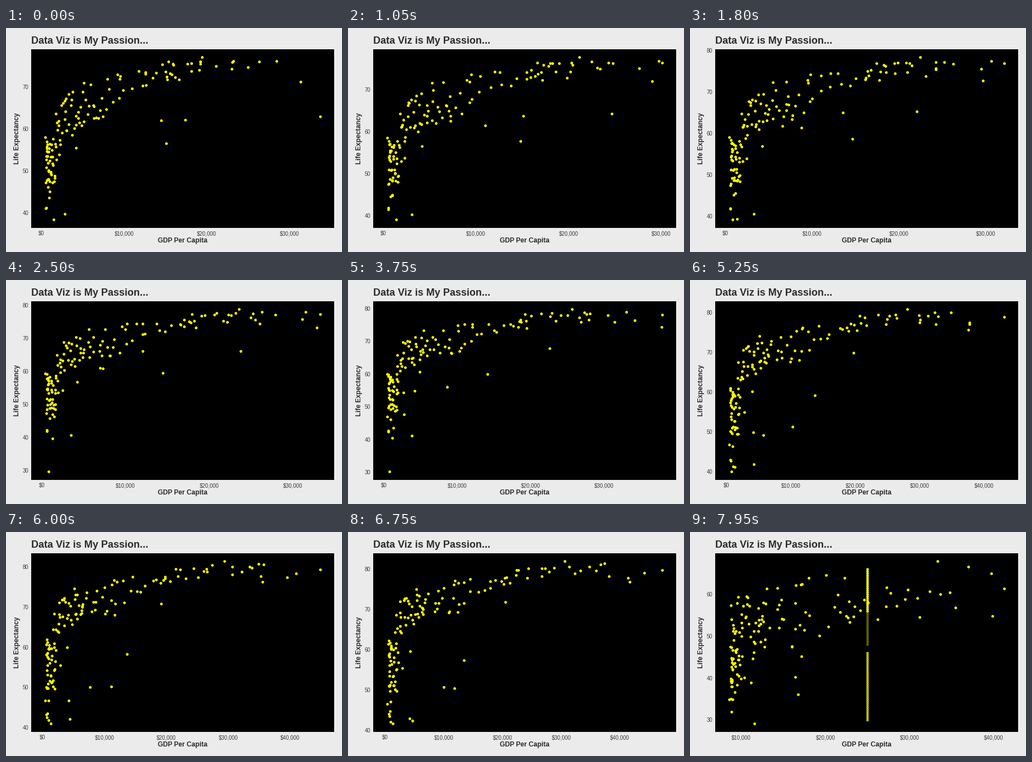
A matplotlib script for the animation above (8 s loop, 600 by 400 pixels).

```python
import numpy as np
import matplotlib.pyplot as plt
from matplotlib.animation import FuncAnimation
from matplotlib.patches import Rectangle

W, H, DPI = 600, 400, 100
FRAMES, INTERVAL = 160, 50
LEFT, RIGHT, TOP, BOTTOM = 45, 585.5, 37.5, 357
PX = 72 / DPI
YELLOW = (1, 1, 0)
STEPS = np.arange(6)
rng = np.random.default_rng(12)

plt.rcParams["font.family"] = "Liberation Sans"

# Countries that stand out, in alphabetical order: income (thousands) and
# life expectancy, each evenly spread over the six surveys
tracks = [
    ((2.8, 4.8), (39.9, 42.7)),
    ((4.55, 12.6), (61.5, 62.9, 50, 50.7)),
    ((.67, .28), (47.8, 46.5)),
    ((.93, 1, 4.4, 12.1), (43.7, 51.6)),
    ((15.1, 13.2), (56.6, 61, 56.7)),
    ((14.6, 39.7), (75.4, 82.2)),
    ((14.5, 6.4, 3.5, 4.5), (62, 59.5)),
    ((12.6, 40.7), (73.1, 78.9)),
    ((19.4, 31.7), (77.1, 82.6)),
    ((31.35, 28.1, 34.9, 40.3, 35.1, 47.3), (71.3, 77.6)),
    ((17.4, 9.5, 12.1), (62.2, 74)),
    ((.42, .37, .94), (58.1, 62.1)),
    ((26.3, 31.54, 33.97, 41.28, 44.68, 49.36), (76, 80.2)),
    ((.8,), (46.2, 44, 23.6, 36.1, 43.4, 46.2)),
    ((33.7, 21.2, 24.8, 20.6, 19, 21.7), (63, 72.8)),
    ((1.46, .86), (38.45, 42.6)),
    ((15.2, 47.1), (71.8, 80)),
    ((4.2,), (55.6, 58, 52, 39.6)),
    ((28.4, 37.5), (76.2, 81.7)),
    ((25, 43), (74.7, 78.2)),
    ((1.3,), (51.8, 47.7, 39.9, 42.4)),
]


def spread(values):
    return np.interp(STEPS, np.linspace(0, 5, len(values)), values)


def cloud(n, x_range, growth, first, last):
    """Seeded countries; first and last hold (base, slope, scatter) of life."""
    lo, hi = x_range
    u = (np.arange(n) + rng.random(n)) / n
    v = rng.uniform(-1, 1, n)
    t = STEPS / 5
    x0 = lo * (hi / lo) ** u
    x1 = x0 * rng.uniform(*growth, n)
    y0, y1 = (b + s * u + k * v for b, s, k in (first, last))
    x = x0[:, None] + np.outer(x1 - x0, t)
    y = y0[:, None] + np.outer(y1 - y0, t)
    x *= 1 + .03 * rng.normal(size=x.shape)
    y += .4 * rng.normal(size=y.shape)
    return np.maximum(x, .46), np.maximum(y, 41.2)


groups = [
    cloud(16, (13.9, 23.3), (1.45, 1.7), (74.3, 1, 1.4), (79.3, .8, 1.2)),
    cloud(13, (9.5, 18), (1.05, 1.55), (71, 0, 2.5), (75.5, 1, 2)),
    cloud(46, (2.25, 9.7), (.85, 1.7), (61, 8, 5.2), (69.5, 4.5, 3.5)),
    cloud(46, (.5, 2.2), (.7, 1.7), (48, 9, 8), (52.5, 8, 9.5)),
]
xs = np.vstack([[spread(a) for a, _ in tracks]] + [g[0] for g in groups])
ys = np.vstack([[spread(b) for _, b in tracks]] + [g[1] for g in groups])
ys = np.minimum(ys, spread(tracks[8][1]))
total = len(xs)

# Final shape: every point heads for a place on one vertical line
named = np.round(np.interp(np.arange(len(tracks)), [0, 4, 5, 10, 12, 20],
                           [4, 45, 56, 75, 97, 141])).astype(int)
free = np.setdiff1d(np.arange(1, total + 1), named)
rich = rng.permutation(free[free < 95])[:16]
others = rng.permutation(np.setdiff1d(free, rich))
rank = np.concatenate([named, rich, others])
goal = np.where(rank < 46, rank,
                np.where(rank < 90, 90 - rank, rank - 49)) / 2
xs = np.column_stack([xs, np.full(total, 25.0)])
ys = np.column_stack([ys, goal])

# New points fading in on that line, with the number of stacked layers
bar_y = np.arange(30, 66.1, .5)
bar_y = bar_y[(bar_y <= 46) | (bar_y >= 48)]
layers = np.where(bar_y <= 46, 3, np.where(bar_y < 56, 1, 8))
bar_x = np.full(len(bar_y), 25.0)

fig = plt.figure(figsize=(W / DPI, H / DPI), dpi=DPI, facecolor="#ebebeb")
ax = fig.add_axes([0, 0, 1, 1])
ax.set_xlim(0, W)
ax.set_ylim(H, 0)
ax.axis("off")
ax.add_patch(Rectangle((LEFT, TOP), RIGHT - LEFT, BOTTOM - TOP,
                       color="black", lw=0))


def label(x, y, text, px, **kw):
    kw = {"color": "#3c3c3c", "va": "baseline", **kw}
    return ax.text(x, y, text, fontsize=px * PX, **kw)


BOLD = dict(weight="bold", color="#2b2b2b")
label(LEFT, 28.3, "Data Viz is My Passion...", 18, **BOLD)
label((LEFT + RIGHT) / 2, 383, "GDP Per Capita", 12, ha="center", **BOLD)
label(22.8, (TOP + BOTTOM) / 2, "Life Expectancy", 12, rotation=90,
      rotation_mode="anchor", ha="center", **BOLD)

x_ticks = {v: label(0, 370.3, f"${v * 1000:,}", 9.6, ha="center")
           for v in range(0, 60, 10)}
y_ticks = {v: label(40, 0, str(v), 9.6, ha="right")
           for v in range(20, 100, 10)}

SIZE = (4.8 * PX) ** 2
dots = ax.scatter(np.zeros(total), np.zeros(total), s=SIZE, color=YELLOW,
                  lw=0, zorder=3)
bar = ax.scatter(bar_x, bar_y, s=SIZE, color=YELLOW, lw=0, zorder=4)


def scale(values, start, end):
    """Map values to pixels with a 5 % margin on both sides."""
    lo, hi = values.min(), values.max()
    pad = (end - start) * .05 / 1.1
    return lambda v: start + pad + (v - lo) / (hi - lo) * (end - start - 2 * pad)


def draw(n):
    p = n / 29 if n < 29 else 1 + (n - 29) / 30
    i = int(p)
    f = p - i
    x = xs[:, i] + f * (xs[:, i + 1] - xs[:, i])
    y = ys[:, i] + f * (ys[:, i + 1] - ys[:, i])
    entering = i == 5 and f > 0

    to_x = scale(np.append(x, bar_x) if entering else x, LEFT, RIGHT)
    to_y = scale(np.append(y, bar_y) if entering else y, BOTTOM, TOP)

    dots.set_offsets(np.column_stack([to_x(x), to_y(y)]))
    bar.set_visible(entering)
    if entering:
        bar.set_offsets(np.column_stack([to_x(bar_x), to_y(bar_y)]))
        rgba = np.tile((*YELLOW, 1.0), (len(bar_y), 1))
        rgba[:, 3] = 1 - (1 - f) ** layers
        bar.set_facecolor(rgba)

    for v, t in x_ticks.items():
        pos = to_x(v)
        t.set_x(pos)
        t.set_visible(bool(LEFT <= pos <= RIGHT))
    for v, t in y_ticks.items():
        pos = to_y(v)
        t.set_y(pos + 3.4)
        t.set_visible(bool(TOP <= pos <= BOTTOM))
    return [dots, bar, *x_ticks.values(), *y_ticks.values()]


anim = FuncAnimation(fig, draw, frames=FRAMES, interval=INTERVAL,
                     init_func=lambda: draw(0), repeat=True, repeat_delay=0,
                     blit=False)
plt.show()
```
